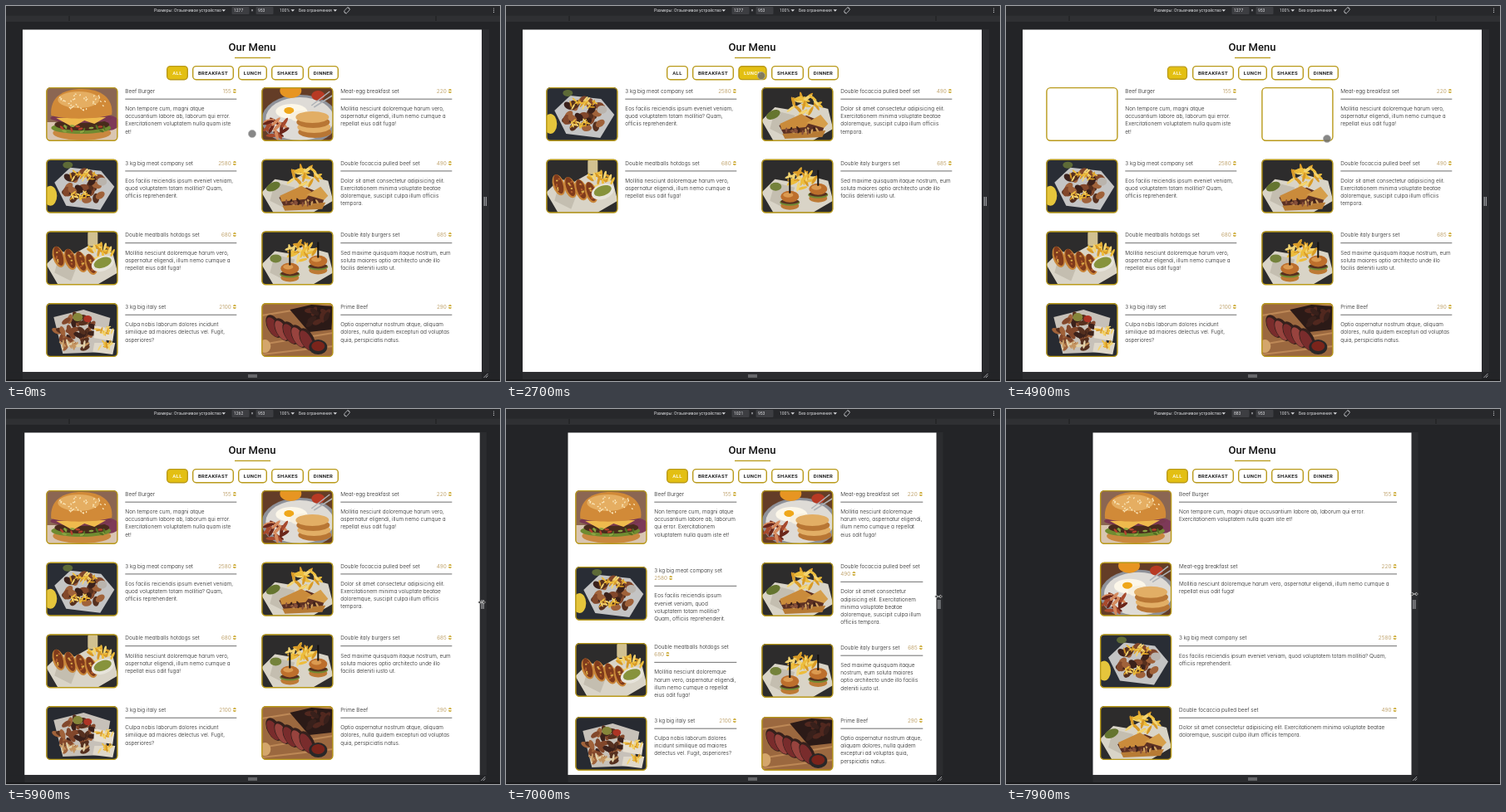
An HTML page for the animation above (8 s loop, 594 px wide and 452 px high).

```html
<!DOCTYPE html>
<html lang="ru">
<head>
<meta charset="utf-8">
<title>Our Menu</title>
<style>
html, body { margin: 0; width: 100%; height: 100%; overflow: hidden; background: #232427; }
svg { display: block; width: 594px; height: 452px; }
text { white-space: pre; }
.bar { font: 5px Roboto, sans-serif; fill: #dcdde0; }
.title { font: 500 13px Roboto, sans-serif; fill: #111; text-anchor: middle; }
.btn { font: 700 6px Roboto, Arial, sans-serif; letter-spacing: .35px; text-anchor: middle; }
.item { font: 300 6.45px Inter, sans-serif; font-feature-settings: "cv11"; fill: #222; }
.price { fill: #b08c48; }
.sign { font-weight: 700; fill: #c6a01c; }
.end { text-anchor: end; }
</style>
</head>
<body>
<svg viewBox="0 0 594 452">
  <defs id="photos"></defs>
  <rect width="594" height="452" fill="#232427"/>
  <g id="stage"></g>
</svg>
<script>
const GOLD = '#e3bf12', EDGE = '#b99a1a';

// Marks inside a text: | wide break, / medium break, ~ single-column break
const MOLLITIA = 'Mollitia nesciunt doloremque /harum vero, |aspernatur eligendi, /illum nemo cumque a |~repellat /eius odit fuga!';
const ITEMS = [
  ['Beef Burger', 155, 'Non tempore cum, magni atque |/accusantium labore ab, laborum /qui error. |~Exercitationem /voluptatem nulla quam iste |et!'],
  ['Meat-egg breakfast set', 220, MOLLITIA],
  ['3 kg big meat company set', 2580, 'Eos facilis reiciendis ipsum /eveniet veniam, |quod /voluptatem totam mollitia? /Quam, |~officiis reprehenderit.'],
  ['Double focaccia pulled beef set', 490, 'Dolor sit amet consectetur /adipisicing elit. |Exercitationem /minima voluptate beatae |~/doloremque, suscipit culpa illum /officiis |tempora.'],
  ['Double meatballs hotdogs set', 680, MOLLITIA],
  ['Double italy burgers set', 685, 'Sed maxime quisquam itaque /nostrum, eum |soluta maiores /optio architecto unde illo |facilis /deleniti iusto ut.'],
  ['3 kg big italy set', 2100, 'Culpa nobis laborum dolores /incidunt |similique ad maiores /delectus vel. Fugit, |asperiores?'],
  ['Prime Beef', 290, 'Optio aspernatur nostrum atque, /aliquam |dolores, nulla quidem /excepturi ad voluptas |quia, /perspiciatis natus.']
];
const MEDIUM_Y = [98, 98, 190, 185, 282, 283, 371, 371];
const FILTERS = [[0, 1, 2, 3, 4, 5, 6, 7], [0, 1], [2, 3, 4, 5], [], [2, 3, 4, 5, 6, 7]];
const BUTTONS = [['ALL', 193, 26], ['BREAKFAST', 224, 50], ['LUNCH', 279, 35], ['SHAKES', 319, 39], ['DINNER', 363, 37]];

// Timelines: time, then values
const CLICKS = [[-9000, 0], [1100, 1], [2200, 2], [3000, 3], [3600, 4], [4700, 0]];
const POINTER = [[0, 296, 154], [900, 250, 90], [1200, 250, 83], [1700, 307, 84], [2700, 307, 84],
  [2900, 339, 83], [3100, 339, 83], [3300, 379, 83], [3900, 379, 83], [4500, 206, 82], [4700, 206, 82],
  [4900, 386, 160], [5400, 576, 233], [5800, 576, 233], [6500, 548, 233], [7000, 520, 226], [7200, 518, 225], [7800, 491, 223]];
const PAGE = [[5800, 552, 1277], [6500, 520, 1175], [7000, 443, 1021], [7200, 437, 1010], [7800, 383, 883]];

function at(keys, t) {
  const i = keys.findIndex(k => k[0] > t);
  if (i === 0) return keys[0].slice(1);
  if (i < 0) return keys.at(-1).slice(1);
  const a = keys[i - 1], b = keys[i], p = (t - a[0]) / (b[0] - a[0]);
  return a.slice(1).map((v, j) => v + (b[j + 1] - v) * p);
}

const rect = (x, y, w, h, fill, more = '') => `<rect x="${x}" y="${y}" width="${w}" height="${h}" fill="${fill}" ${more}/>`;
const oval = (x, y, rx, ry, fill, turn = 0) => `<ellipse cx="${x}" cy="${y}" rx="${rx}" ry="${ry}" fill="${fill}" transform="rotate(${turn} ${x} ${y})"/>`;
const path = (d, fill) => `<path d="${d}" fill="${fill}"/>`;
const line = (d, color, w = 1) => `<path d="${d}" fill="none" stroke="${color}" stroke-width="${w}"/>`;
const text = (x, y, s, cls) => `<text x="${x}" y="${y}" class="${cls}">${s}</text>`;

let seed = 7;
const rnd = () => (seed = seed * 16807 % 2147483647) / 2147483647;
function scatter(n, x, y, rx, ry, w, h, colors) {
  let s = '';
  for (let i = 0; i < n; i++) {
    const a = rnd() * 6.28, r = Math.sqrt(rnd());
    s += oval(x + Math.cos(a) * r * rx, y + Math.sin(a) * r * ry, w, h, colors[i % colors.length], rnd() * 180);
  }
  return s;
}
const FRIES = ['#edbd3c', '#d99a26', '#f3d471'];
const MEAT = ['#56301f', '#82472b', '#3b211b', '#a0623a'];
const paper = rect(0, 0, 86, 65, '#2d2c2c') + path('M0 40L16 24 34 27 50 18 80 26 86 50 62 64H14Z', '#d9d4c7') + path('M16 28L40 34 30 60 10 50Z', '#c4beb0');
const burger = (x, y) => oval(x, y + 7, 11, 5, '#bd7a35') + oval(x, y + 3, 12, 4, '#6f8a34') + oval(x, y + 2, 11, 3, '#57301f')
  + oval(x, y - 4, 11, 7, '#bd6f2c') + oval(x - 2, y - 6, 6, 3, '#db9a50') + line(`M${x} ${y - 8}V${y - 27}`, '#15120f', 2);
const hotdog = (x, y) => oval(x, y, 7, 13, '#c98538', -18) + oval(x, y - 1, 5, 12, '#803b1c', -18) + scatter(7, x, y, 3, 8, 1.3, 1, ['#b5602b', '#ddb04b']);

const PHOTOS = [
  rect(0, 0, 86, 65, '#8b6652') + rect(0, 42, 86, 23, '#d9c6b2') + oval(76, 43, 12, 9, '#7d3958')
    + oval(43, 55, 35, 9, '#c9883f') + oval(42, 49, 36, 7, '#6f8b31') + oval(43, 45, 33, 7, '#482b1c')
    + oval(42, 37, 37, 6, '#793850') + path('M12 37L72 36 58 44 46 40 32 48Z', '#efba4d')
    + path('M6 34C4 12 20 2 43 2S81 13 79 33C60 39 22 39 6 34Z', '#d18a38') + oval(39, 15, 25, 10, '#e5ae62')
    + scatter(38, 42, 17, 30, 11, 1.2, .7, ['#fae7bb']) + scatter(16, 43, 50, 32, 4, 3, 1.3, ['#8ba342', '#b6422d', '#536f24']),
  rect(0, 0, 86, 65, '#643d27') + oval(46, 39, 46, 30, '#8e9199') + oval(46, 38, 41, 26, '#dedbd6') + oval(35, 4, 13, 9, '#e79522')
    + oval(68, 10, 8, 6, '#b83a24') + line('M60 22L82 5M63 24L85 10', '#aeb2b7', 1.5)
    + oval(36, 29, 19, 9, '#fcf7e9') + oval(33, 28, 6, 4, '#efa719') + oval(48, 35, 14, 7, '#f7f0df') + oval(49, 34, 5, 3, '#f0b02e')
    + [54, 48, 42, 36].map((y, i) => oval(64 - i, y, 20, 7, i % 2 ? '#e2ae65' : '#b87634')).join('')
    + scatter(16, 17, 48, 13, 11, 7, 2, ['#6a2519', '#a74a2d', '#d58a5e']),
  rect(0, 0, 86, 65, '#292d35') + path('M10 28L29 10 66 14 82 33 65 61 24 56Z', '#c4c4c4') + oval(5, 44, 8, 12, '#e5c53c') + oval(26, 7, 6, 4, '#5d6a37')
    + scatter(32, 46, 33, 25, 18, 6, 4, MEAT) + scatter(20, 45, 20, 17, 7, 4, 1, FRIES) + scatter(14, 40, 45, 10, 6, 4, 1, FRIES) + oval(67, 27, 6, 5, '#bab4ad'),
  paper + oval(14, 33, 9, 5, '#65752f', -25) + scatter(26, 50, 20, 19, 11, 6, 1.6, FRIES) + path('M21 46L54 34 77 43 72 57 28 59Z', '#5c3023')
    + path('M22 44L48 32 60 39 53 48 24 51Z', '#ca8b3b') + path('M54 43L71 33 80 44 75 49Z', '#d69f4b') + path('M25 56L52 54 77 52 73 60 28 62Z', '#b77b35')
    + scatter(16, 50, 52, 24, 3, 3, 1.2, ['#87503a', '#d0a15d', '#3d211a']),
  paper + rect(50, 0, 12, 18, '#d1c191', 'rx="3"') + scatter(20, 66, 25, 15, 8, 5, 1.5, FRIES) + [15, 29, 42, 54].map((x, i) => hotdog(x, 31 + i * 3)).join('')
    + oval(68, 39, 14, 9, '#e7e4db', -20) + oval(68, 38, 11, 6, '#87933c', -20),
  paper + oval(17, 33, 7, 5, '#74823b') + scatter(28, 48, 24, 16, 11, 6, 1.7, FRIES) + burger(34, 49) + burger(68, 40),
  rect(0, 0, 86, 65, '#272a31') + path('M9 17L45 8 77 18 70 59 20 61Z', '#c7c1b9') + scatter(38, 37, 35, 25, 21, 6, 3, MEAT)
    + scatter(14, 32, 51, 17, 4, 5, 1.3, ['#e0d0aa', '#c59560']) + oval(38, 17, 6, 5, '#86863a') + oval(50, 19, 5, 4, '#ad3425')
    + path('M58 27L82 32 80 46 57 42Z', '#e6ded0') + scatter(12, 70, 33, 10, 4, 4, 1, FRIES) + path('M58 48L83 48 80 62 56 59Z', '#dfd8ca') + scatter(12, 70, 51, 10, 4, 4, 1, FRIES),
  rect(0, 0, 86, 65, '#9b683f') + line('M0 15L86 1M0 50L86 36M0 62L86 52', '#bd8856', 2) + path('M34 8L60 2 86 4 84 32 57 35Z', '#2b1a17')
    + scatter(12, 65, 17, 17, 10, 6, 3, ['#51281f', '#38201b']) + [0, 1, 2, 3, 4].map(i => oval(15 + i * 10, 28 + i * 4, 8, 15, '#35201c', -28) + oval(14 + i * 10, 29 + i * 4, 6, 13, i % 2 ? '#98433e' : '#792c2c', -28)).join('')
    + oval(68, 53, 11, 9, '#292728') + oval(68, 52, 8, 6, '#7a241b') + oval(4, 52, 7, 8, '#d4a66b')
];
document.getElementById('photos').innerHTML = '<clipPath id="round"><rect width="86" height="64.5" rx="5"/></clipPath>'
  + PHOTOS.map((p, i) => `<g id="photo${i}" clip-path="url(#round)">${p}</g>`).join('');

function item(id, x, y, width, mode, loaded) {
  const [name, price, body] = ITEMS[id];
  const tall = mode === 1 && id > 1 && id < 5 ? 9.2 : 0;
  const tx = x + 95, right = x + width;
  const lines = body.split('|/~'[mode]).map(s => s.replace(/[|/~]/g, ''));
  return (loaded ? `<use href="#photo${id}" x="${x}" y="${y}"/>` : '')
    + rect(x + .6, y + .6, 85, 63.7, 'none', `rx="4.5" stroke="${EDGE}" stroke-width="1.4"`)
    + text(tx, y + 7, name, 'item')
    + text(tall ? tx : right, y + 7 + tall, `${price} <tspan class="sign">₴</tspan>`, 'item price' + (tall ? '' : ' end'))
    + rect(tx, y + 13.6 + tall, width - 95, 1.2, '#858585')
    + lines.map((s, i) => text(tx, y + 28.2 + tall + i * 9.1, s, 'item')).join('');
}

function button([label, x, w], active, scale) {
  const cx = x + w / 2;
  return `<g transform="translate(${cx} 80.7) scale(${scale})">`
    + rect(-w / 2 + .7, -8.1, w - 1.4, 16.2, active ? GOLD : '#fff', `rx="4" stroke="${EDGE}" stroke-width="1.4"`)
    + `<text y="2.2" class="btn" fill="${active ? '#fffbe5' : '#222'}">${label}</text></g>`;
}

const arrow = (x, y) => path(`M${x} ${y}h4.5l-2.2 2.6z`, '#dcdde0');
const toolbar = label => rect(0, 0, 594, 11.5, '#27282b') + rect(0, 11.5, 594, 7.5, '#2f3033')
  + line('M76 12V18M517 12V18', '#1c1d1f')
  + text(178, 7.3, 'Размеры: Отзывчивое устройство', 'bar') + arrow(259.5, 4.2)
  + rect(271.5, 1, 21, 9, '#3d3e42', 'rx="1"') + text(274, 7.3, label, 'bar') + text(294.8, 7.3, '×', 'bar')
  + rect(300.5, 1, 21, 9, '#3d3e42', 'rx="1"') + text(303, 7.3, '953', 'bar')
  + text(329, 7.3, '100%', 'bar') + arrow(342.5, 4.2) + text(352, 7.3, 'Без ограничения', 'bar') + arrow(393.5, 4.2)
  + '<rect x="-2" y="-3.2" width="4" height="6.4" rx=".7" transform="translate(410 5.3) rotate(42)" fill="none" stroke="#b9bbbf" stroke-width=".8"/>'
  + line('M406.5 6.5q.3 2.6 2.8 2.6M413.3 4q-.2-2.6-2.7-2.6', '#b9bbbf', .7)
  + [3, 5.2, 7.4].map(y => oval(586.5, y, .6, .6, '#c6c7ca')).join('');

function pointer(x, y, resizing) {
  if (!resizing) return `<circle cx="${x}" cy="${y}" r="4.6" fill="#6d6d6d" fill-opacity=".82" stroke="#b2b2b2" stroke-opacity=".8" stroke-width=".8"/>`;
  const d = `M${x - 4.5} ${y}l2.5-2v1.5h4v-1.5l2.5 2-2.5 2v-1.5h-4v1.5z`;
  return `<path d="${d}" fill="#222" stroke="#ddd" stroke-width=".6"/>`;
}

function draw(t) {
  const [w, size] = at(PAGE, t), label = Math.round(size);
  const left = 296 - w / 2, edge = 296 + size * .2165;
  const [clicked, active] = CLICKS.findLast(c => c[0] <= t);
  const press = .9 + .1 * Math.min(1, (t - clicked) / 600);
  const fluid = Math.min(229, (w - 55) / 2);
  const mode = size < 992 ? 2 : fluid < 215 ? 1 : 0;

  let s = rect(edge, 28, 8.5, 422, '#2b2c2f')
    + line(`M${edge + 2.7} 230v11M${edge + 4.8} 230v11`, '#b5b6b9')
    + rect(left, 28.5, w, 413, '#fff')
    + text(296, 54, 'Our Menu', 'title') + rect(275, 61.8, 43, 1.3, EDGE);
  BUTTONS.forEach((b, i) => s += button(b, i === active, i === active ? press : 1));
  FILTERS[active].forEach((id, i) => {
    const loaded = !(id < 2 && t >= 4700 && t < 5000);
    if (mode === 2) s += item(id, left + 8.5, 98 + i * 86.7, w - 26, mode, loaded);
    else s += item(id, i % 2 ? 307.3 : 277.3 - fluid, mode ? MEDIUM_Y[i] : 98 + (i >> 1) * 86.7, fluid, mode, loaded);
  });
  s += rect(0, 441.3, 594, 10.7, '#232427') + rect(left, 441.3, w, 8.7, '#2b2c2f') + rect(0, 450.3, 594, 1.7, '#171719')
    + line('M291 445h11M291 447h11', '#a0a1a4')
    + line(`M${edge + 2} 448l5-5M${edge + 4.5} 448l2.5-2.5`, '#b5b6b9', .9)
    + toolbar(label) + pointer(...at(POINTER, t), t >= 5400);
  document.getElementById('stage').innerHTML = s;
}

let shown = -1;
function tick(now) {
  const t = Math.floor(now % 8000 / 100) * 100;
  if (t !== shown) draw(shown = t);
  requestAnimationFrame(tick);
}
draw(0);
requestAnimationFrame(tick);
</script>
</body>
</html>
```
